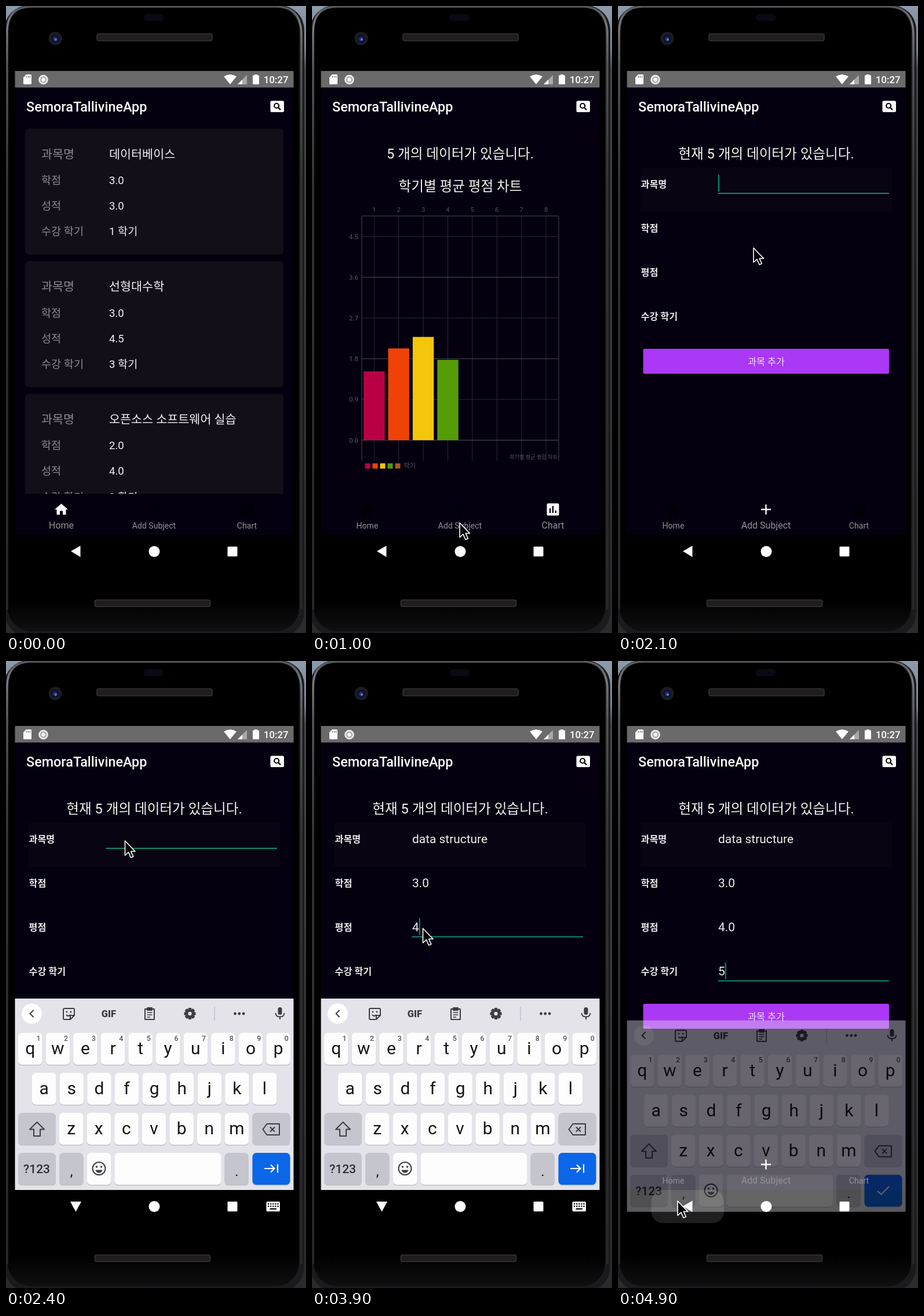
Recreate the animation shown at these times as an HTML page. Size 518 by 1081 pixels, loop 5000 ms.

```html
<!DOCTYPE html>
<html lang="ko">
<head>
<meta charset="utf-8">
<title>Grade notebook</title>
<style>
html, body { margin: 0; width: 100%; height: 100%; overflow: hidden; background: #000; }
svg { display: block; width: 100%; height: 100%; }
text { font-family: Roboto, "Noto Sans CJK KR", "Noto Sans CJK", sans-serif; white-space: pre; }
</style>
</head>
<body>
<svg id="stage" viewBox="0 0 518 1081" preserveAspectRatio="none"></svg>
<script>
const LOOP = 5000, STEP = 100;
const BG = '#04000f', TEAL = '#0e8a6e', DIM = '#8b8992', INK = '#3c3c42';

// markup helpers
const rect = (x, y, w, h, fill, r = 0, more = '') =>
  `<rect x="${x}" y="${y}" width="${w}" height="${h}" rx="${r}" fill="${fill}" ${more}/>`;
const circ = (x, y, r, fill, more = '') => `<circle cx="${x}" cy="${y}" r="${r}" fill="${fill}" ${more}/>`;
const path = (d, fill = 'none', more = '') => `<path d="${d}" fill="${fill}" ${more}/>`;
const line = (d, color, w = 2, more = '') => path(d, 'none', `stroke="${color}" stroke-width="${w}" ${more}`);
const text = (x, y, size, s, fill = '#fff', more = '') =>
  `<text x="${x}" y="${y}" font-size="${size}" fill="${fill}" ${more}>${s}</text>`;
const group = (id, body, more = '') => `<g id="${id}" ${more}>${body}</g>`;
const many = (n, fn) => Array.from({ length: n }, (_, i) => fn(i)).join('');
const MID = 'text-anchor="middle"', END = 'text-anchor="end"', MED = 'font-weight="500"', BOLD = 'font-weight="700"';

function phone() {
  return rect(0, 0, 518, 1081, 'url(#wall)') +
    rect(-3, -1, 518, 1088, '#1b1b1d', 42) +
    rect(3, 1, 503, 1077, 'url(#body)', 40) +
    line('M2 1040V44Q2 1 44 1H468Q510 2 510 50V1040', 'url(#rim)', 3.5) +
    rect(238, 14, 34, 12, '#0b0915', 5) +
    circ(85, 56, 11.5, '#1d1c22') + circ(85, 56, 7, '#11122c') +
    circ(85, 57, 3.5, '#30368c') + circ(86, 58, 1.5, '#8890e8') +
    rect(157, 48, 199, 12, '#1f1d1d', 3, 'stroke="#383535" stroke-width="1.5"') +
    rect(153.5, 1024, 199, 11.5, '#1f1d1e', 3, 'stroke="#383537" stroke-width="1.5"') +
    rect(15.5, 112, 481, 800, BG);
}

function topBars() {
  return rect(15.5, 112, 481, 28.5, '#6a6a6a') +
    path('M35 118H42.500Q44 118 44 119.500V133.500Q44 135 42.500 135H31.500Q30 135 30 133.500V123Z', '#fff') +
    line('M35.500 120.500v3M38.500 120.500v3M41.500 120.500v3', '#6a6a6a', 1.3) +
    circ(64.5, 127, 7.2, '#b5b5b5', 'stroke="#f2f2f2" stroke-width="2.2"') + circ(64.5, 127, 3, '#fff') +
    path('M387 135L376 121.500Q387 114.500 398 121.500Z', '#fff') +
    path('M416 119V135H400Z', '#a9a9a9') + path('M408 127V135H400Z', '#fff') +
    path('M429 119.500V118H434V119.500H437V135H426V119.500Z', '#fff') +
    text(445, 133, 16.8, '10:27', '#fff', MED) +
    text(35, 182, 23.4, 'SemoraTallivineApp', '#fff', MED) +
    rect(456.5, 163.5, 23.5, 19.5, '#fff', 2.5) +
    circ(467.2, 172, 4, 'none', 'stroke="#08040f" stroke-width="2.2"') + line('M470 175L474 179.200', '#08040f', 2.4);
}

function card(y, name, credit, grade, term) {
  const rows = [['과목명', name], ['학점', credit], ['성적', grade], ['수강 학기', term + ' 학기']];
  return rect(33, y, 446, 217, '#120f18', 6) + rows.map(([label, value], i) => {
    const base = y + (i ? 51.5 + 44.1 * i : 51), size = i ? 18.6 : 20.7;
    return text(61, base, size, label, DIM) + text(178, base, size, value, '#f1f0f3');
  }).join('');
}

const homePage = () => card(211.5, '데이터베이스', '3.0', '3.0', 1) +
  card(440, '선형대수학', '3.0', '4.5', 3) +
  card(668.7, '오픈소스 소프트웨어 실습', '2.0', '4.0', 2);

// bar chart
const HUES = ['#b90045', '#f04207', '#f3c60b', '#559d07', '#b05426'];
const GRADES = [3, 4, 4.5, 3.5, 0, 3.5];
const colX = i => 107.3 + 42.4 * i, gradeY = g => 748.5 - 78 * g;

function chartPage() {
  return text(256, 263, 23.6, '5 개의 데이터가 있습니다.', '#f4f4f5', MID) +
    text(256, 318.5, 23.6, '학기별 평균 평점 차트', '#f4f4f5', MID) +
    many(8, i => line(`M${colX(i)} 362V784`, '#2c2934', 1) + text(colX(i), 355, 11.3, i + 1, '#55525c', MID)) +
    many(6, i => line(`M86 ${gradeY(i * .9)}H426`, i % 2 ? '#2c2934' : '#514e58', 1) +
      text(80, gradeY(i * .9) + 4, 11.5, (i * .9).toFixed(1), '#5b5862', END)) +
    line('M86 784V362H426V784', '#4a4751', 1) +
    group('bars', GRADES.map((g, i) => rect(colX(i) - 18.2, 748, 36.4, 0, HUES[i % 5])).join('')) +
    text(424, 781, 9.2, '학기별 평균 평점 차트', '#57535f', END) +
    HUES.map((c, i) => rect(91.5 + 13 * i, 788.5, 9, 9, c)).join('') +
    text(158, 797, 11.5, '학기', '#57535f');
}

function formPage() {
  return rect(39, 279, 434, 76, '#080412') +
    text(256, 263, 23.6, '현재 5 개의 데이터가 있습니다.', '#f4f4f5', MID) +
    ['과목명', '학점', '평점', '수강 학기'].map((s, i) =>
      text(39.5, 312.7 + 76.2 * i, 16.2, s, '#ececef', BOLD)).join('') +
    many(4, i => text(173, 313.7 + 76.2 * i, 20.9, '', '#efeff2', 'class="value"')) +
    group('focus', line('M172.500 323H468', TEAL) + line('M174 291V320', TEAL, 2, 'id="caret"')) +
    rect(43.5, 591, 424.5, 43, '#ab38f5', 2.5) +
    text(256, 618.5, 16.2, '과목 추가', '#eedffb', MID);
}

// bottom tabs: icons are drawn around 0,0
const TABS = [
  [95.5, 'Home', '<path d="M0 -10L-11.500 0H-8V9H-2.500V2.500H2.500V9H8V0H11.500Z"/>'],
  [255.5, 'Add Subject', '<path d="M-1.200 -8.500H1.200V-1.200H8.500V1.200H1.200V8.500H-1.200V1.200H-8.500V-1.200H-1.200Z"/>'],
  [416, 'Chart', '<path fill-rule="evenodd" d="M-8 -10.500H8Q10.500 -10.500 10.500 -8V8Q10.500 10.500 8 10.500H-8Q-10.500 10.500 -10.500 8V-8Q-10.500 -10.500 -8 -10.500ZM-6 -2V6H-3.700V-2ZM-1.200 -6V6H1.200V-6ZM3.700 2V6H6V2Z"/>']
];
const tabs = () => TABS.map(([x, name, icon]) => `<g class="tab"><g>${icon}</g>${text(x, 901, 14.1, name, '#93919a', MID)}</g>`).join('');

// keyboard
const key = (x, y, w, fill = '#fdfdfe') => rect(x, y + 1.3, w, 55, '#bdbdc6', 6.5) + rect(x, y, w, 55, fill, 6.5);
const keyRow = (chars, x0, y) => [...chars].map((c, i) => {
  const x = x0 + 47.6 * i;
  return key(x, y, 41.5) + text(x + 20.7, y + 37, 30, c, '#151517', MID);
}).join('');

function keyboard() {
  const gray = '#c5c5ce', st = `stroke="${INK}" stroke-width="2" stroke-linejoin="round"`;
  return rect(15.5, 582, 481, 330, '#e3e3e9') +
    circ(44.5, 608, 17.5, '#fff') + line('M47.500 602L41.500 608L47.500 614', INK) +
    path('M101 599H116Q118 599 118 601V611L111 618H101Q99 618 99 616V601Q99 599 101 599ZM118 611H111V618', 'none', st) +
    circ(105, 605, 1.4, INK) + circ(112, 605, 1.4, INK) + line('M104 610Q107.500 614 111 610', INK) +
    text(177.5, 614, 16.5, 'GIF', INK, MID + ' font-weight="900"') +
    path('M240 600H256V618H240ZM244 598H252V602H244Z', 'none', st) + line('M243.500 606H252.500M243.500 610H252.500M243.500 614H249', INK, 1.7) +
    many(4, i => rect(314.7, 598, 5.6, 20, INK, 1.2, `transform="rotate(${45 * i} 317.500 608)"`)) +
    circ(317.5, 608, 7.6, INK) + circ(317.5, 608, 3.2, '#e3e3e9') +
    line('M360 596V620', '#bcbcc4', 1.3) + many(3, i => circ(395.5 + 7.3 * i, 608, 2.4, INK)) +
    rect(469.5, 597, 7, 13, INK, 3.5) + line('M465.500 607Q466 613.500 473 613.500Q480 613.500 480.500 607M473 613V618', INK) +
    keyRow('qwertyuiop', 21, 641) +
    many(10, i => text(56 + 47.6 * i, 654.5, 12.5, (i + 1) % 10, '#55555c', MID + ' ' + MED)) +
    keyRow('asdfghjkl', 45, 710) +
    key(21, 779, 65, gray) + path('M53.500 795L66 807.500H59V819H48V807.500H41Z', 'none', st) +
    keyRow('zxcvbnm', 92, 779) +
    key(425.5, 779, 65, gray) + path('M450.500 798H472V817H450.500L443.500 807.500Z', 'none', st) +
    line('M456 803.500L464 811.500M464 803.500L456 811.500', INK) +
    key(21, 848, 65, gray) + text(53, 883, 21, '?123', '#2e2e34', MID + ' ' + MED) +
    key(92, 848, 41.5, gray) + text(113, 888, 24, ',', '#151517', MID) +
    key(140, 848, 41.5) + circ(160.5, 875, 11, 'none', st) + circ(156.5, 872, 1.7, INK) + circ(164.5, 872, 1.7, INK) +
    path('M154.500 877.500H166.500Q165 882.500 160.500 882.500Q156 882.500 154.500 877.500Z', INK) +
    key(187.5, 848, 184) +
    key(377.5, 848, 41.5, gray) + text(398.5, 888, 24, '.', '#151517', MID) +
    key(425.5, 848, 65, '#0b66e8') +
    group('next', line('M446 875H463M457 868.500L463.500 875L457 881.500M469 867.500V882.500', '#fff', 2.2)) +
    group('done', line('M448 876L454.500 882L468 868.500', '#fff', 2));
}

function sysNav() {
  return group('ripple', rect(57.5, 912, 125.5, 57, '#fff', 20)) +
    group('back', path('M112 940L128.500 930.500V950Z', '#fff')) +
    group('down', path('M111 932H130L120.500 949.500Z', '#fff') + rect(449.5, 932, 23.5, 17, '#fff', 2) +
      many(10, i => rect(452 + 4.1 * (i % 5), 935 + 4 * (i / 5 | 0), 2.2, 2.2, '#000')) + rect(455.5, 943.5, 11.5, 2.2, '#000')) +
    circ(256, 940.5, 9.5, '#fff') + rect(382.5, 932, 17, 17, '#fff', 1.5);
}

const $ = id => document.getElementById(id);
const stage = $('stage');
stage.innerHTML = `<defs>
  <linearGradient id="wall" x2="0" y2="1"><stop stop-color="#8d9bab"/><stop offset=".07" stop-color="#78828e"/><stop offset=".1" stop-color="#45464b"/><stop offset="1" stop-color="#2b2b2e"/></linearGradient>
  <linearGradient id="rim" gradientUnits="userSpaceOnUse" x1="0" y1="0" x2="0" y2="1040"><stop stop-color="#55565a"/><stop offset=".03" stop-color="#7b7c80"/><stop offset=".1" stop-color="#55565a"/><stop offset=".3" stop-color="#343437"/><stop offset="1" stop-color="#29292c"/></linearGradient>
  <linearGradient id="body" x2="0" y2="1"><stop offset=".95" stop-color="#000"/><stop offset="1" stop-color="#101012"/></linearGradient>
  <clipPath id="list"><path d="M15 206H497V841H15Z"/></clipPath></defs>` +
  phone() + group('form', formPage()) + group('wash', rect(15.5, 206, 481, 641, '#fff')) +
  group('chart', chartPage()) + group('home', homePage(), 'clip-path="url(#list)"') +
  topBars() + group('keys', keyboard()) + group('tabs', tabs()) + sysNav() +
  group('pointer', path('M0 0V25L6 19.700L10 29L14.300 27.200L10.300 18.300H17.500Z', '#050308', 'stroke="#fff" stroke-width="1.6" stroke-linejoin="round"'));

const values = [...document.querySelectorAll('.value')];
const tabEls = [...document.querySelectorAll('.tab')];
const barEls = [...$('bars').children];

const clamp = v => Math.max(0, Math.min(1, v));
const ramp = (t, a, b) => clamp((t - a) / (b - a));
const show = (id, on) => $(id).setAttribute('opacity', +on);
const typed = (s, t, start, pace) => t < start ? '' : s.slice(0, Math.floor((t - start) / pace) + 1);

// pointer stops: time, x, y
const STOPS = [
  [100, 505, 956], [300, 432, 888], [400, 420, 876], [650, 418, 877], [800, 345, 885], [1000, 255, 891],
  [1300, 246, 901], [1500, 245, 902], [1700, 244, 885], [1900, 240, 640], [2100, 234, 417], [2300, 206, 318],
  [2400, 205.5, 310], [3100, 205.5, 310], [3300, 194, 386], [3600, 194, 386], [3800, 191.5, 461],
  [4100, 191.5, 461], [4300, 191, 537], [4500, 191, 537], [4800, 92, 921], [4900, 103, 931]
];
function pointerAt(t) {
  const i = Math.max(1, STOPS.findIndex(s => s[0] >= t));
  const [t0, x0, y0] = STOPS[i - 1], [t1, x1, y1] = STOPS[i];
  const p = ramp(t, t0, t1);
  return [x0 + (x1 - x0) * p, y0 + (y1 - y0) * p];
}

function draw(t) {
  // page changes: the old page fades out over a pale wash
  const toChart = ramp(t, 400, 600), toForm = ramp(t, 1400, 1600);
  const leave = p => (1 - p) ** 2.6, enter = p => 1 - (1 - p) ** 4;
  const bump = p => 4 * p * (1 - p);
  show('wash', .22 * (bump(toChart) + bump(toForm)));
  show('home', leave(toChart));
  show('chart', enter(toChart) * leave(toForm));
  show('form', enter(toForm));

  // keyboard slides and fades
  const up = ramp(t, 2233, 2400) * (1 - ramp(t, 4800, 4967));
  $('keys').setAttribute('transform', `translate(0 ${105 * (1 - up) ** 2})`);
  show('keys', up);
  show('tabs', up < 1);

  const weight = [1 - toChart, toForm, toChart * (1 - toForm)];
  const active = t < 500 ? 0 : t < 1500 ? 2 : 1;
  tabEls.forEach((el, i) => {
    const [icon, label] = el.children;
    icon.setAttribute('transform', `translate(${TABS[i][0]} ${870 - 2 * weight[i]})`);
    icon.setAttribute('fill', i === active ? '#fff' : '#010005');
    icon.setAttribute('opacity', +(i === active || !up));
    label.setAttribute('font-size', 14.1 + 1.9 * weight[i]);
  });

  const grow = ramp(t, 493, 1493);
  barEls.forEach((el, i) => {
    const h = i < Math.ceil(8 * grow) ? 78 * GRADES[i] * grow : 0;
    el.setAttribute('y', 748.5 - h);
    el.setAttribute('height', h);
  });

  // form entry
  const words = [typed('data structure', t, 2500, 45), typed('3.0', t, 3400, 100),
    typed('4.0', t, 3900, 100), typed('5', t, 4500, 100)];
  words.forEach((s, i) => { values[i].textContent = s; });
  const field = (t >= 3300) + (t >= 3800) + (t >= 4300);
  $('focus').setAttribute('transform', `translate(0 ${76.2 * field})`);
  const width = words[field] ? values[field].getComputedTextLength() : 0;
  $('caret').setAttribute('transform', `translate(${width} 0)`);
  show('caret', t >= 2500 || (t - 1500) % 600 < 300);

  show('next', field < 3);
  show('done', field === 3);
  const open = t >= 2300 && t < 4900;
  show('down', open);
  show('back', !open);
  show('ripple', t >= 4900 ? .12 : 0);

  show('pointer', t >= 100);
  $('pointer').setAttribute('transform', `translate(${pointerAt(t)})`);
}

const begin = performance.now();
function tick() {
  const t = (performance.now() - begin + 4) % LOOP;
  draw(Math.floor(t / STEP) * STEP);
  requestAnimationFrame(tick);
}
tick();
</script>
</body>
</html>
```
